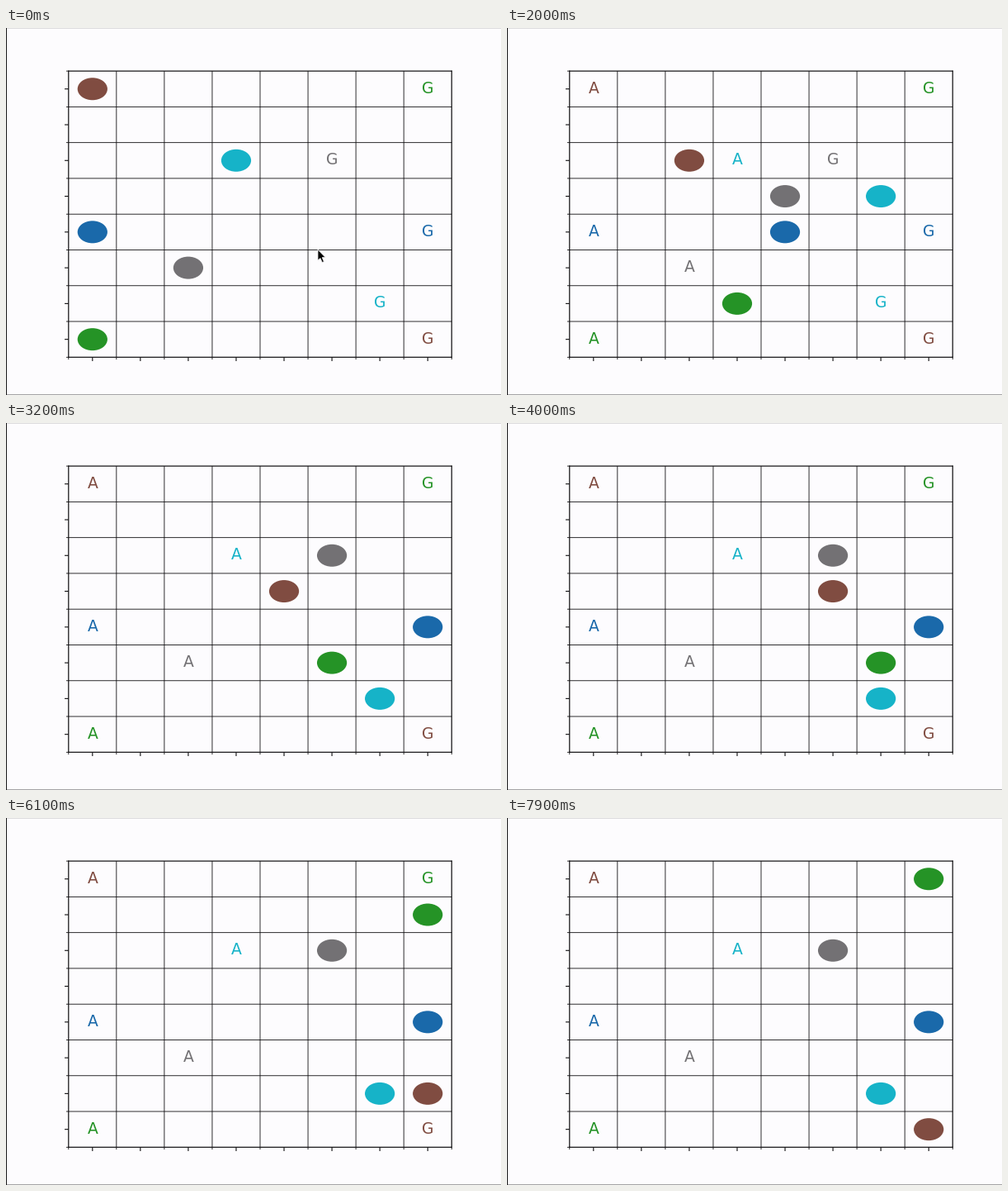
A matplotlib script that plays this animation: 600x444 px, repeating every 8000 ms.

```python
import matplotlib.pyplot as plt
from matplotlib.animation import FuncAnimation
from matplotlib.patches import Ellipse, Polygon

W, H, DPI = 600, 444, 100
FRAMES, INTERVAL = 80, 100
HOLD = 5                      # frames per grid move
N = 8
LEFT, RIGHT, TOP, BOTTOM = 75.8, 540.2, 52.1, 398.3
CW, CH = (RIGHT - LEFT) / N, (BOTTOM - TOP) / N
INK = "#0c0b0d"
STEP = {"U": (0, -1), "D": (0, 1), "L": (-1, 0), "R": (1, 0)}

# colour, start cell (column, row), moves
AGENTS = [
    ("#804c41", (0, 0), "DRDRRRDRDRDRDD"),
    ("#16b3c8", (3, 2), "DRRRDDD"),
    ("#1a69aa", (0, 4), "RRRRRRR"),
    ("#737174", (2, 5), "RRUURU"),
    ("#259326", (0, 7), "URRRRRURUURUUU"),
]


def px(width):
    return width * 72 / DPI


def center(cell):
    return LEFT + (cell[0] + 0.5) * CW, TOP + (cell[1] + 0.5) * CH


def route(start, moves):
    cells = [start]
    for m in moves:
        dx, dy = STEP[m]
        x, y = cells[-1]
        cells.append((x + dx, y + dy))
    return cells


fig = plt.figure(figsize=(W / DPI, H / DPI), dpi=DPI, facecolor="#fdfcfe")
ax = fig.add_axes([0, 0, 1, 1])
ax.set_xlim(0, W)
ax.set_ylim(H, 0)
ax.axis("off")


def line(x0, y0, x1, y1, width=0.85, color=INK):
    # snapping would shift the lines by up to a pixel
    ax.plot([x0, x1], [y0, y1], color=color, lw=px(width), snap=False,
            solid_capstyle="butt", zorder=1)


# window edges
line(0, 0.5, W, 0.5, 1, "#dddcde")
line(0, H - 0.5, W, H - 0.5, 1, "#a5a4a6")
line(0.5, 0, 0.5, H, 1, "#1a191b")

# grid, frame and ticks
for i in range(N + 1):
    x, y = LEFT + i * CW, TOP + i * CH
    if 0 < i < N:
        line(x, TOP, x, BOTTOM)
        line(LEFT, y, RIGHT, y)
    line(x, BOTTOM, x, BOTTOM + 2.8)
    line(LEFT - 2.8, y, LEFT, y)
    if i < N:
        cx, cy = center((i, i))
        line(cx, BOTTOM, cx, BOTTOM + 4.7, 1.1)
        line(LEFT - 4.7, cy, LEFT, cy, 1.1)
for x in (LEFT, RIGHT):
    line(x, TOP - 0.5, x, BOTTOM + 0.5, 1.2)
for y in (TOP, BOTTOM):
    line(LEFT - 0.5, y, RIGHT + 0.5, y, 1.2)

routes, discs = [], []
for color, start, moves in AGENTS:
    cells = route(start, moves)
    for letter, cell in (("A", cells[0]), ("G", cells[-1])):
        x, y = center(cell)
        ax.text(x, y - 0.5, letter, color=color, fontsize=px(18.8),
                family="DejaVu Sans", ha="center", va="center", zorder=2)
    disc = Ellipse(center(start), 36.2, 27, fc=color, ec="none", zorder=3)
    ax.add_patch(disc)
    routes.append(cells)
    discs.append(disc)

pointer = Polygon(
    [(378, 268), (378, 281.2), (381, 278.6), (383.3, 283.6), (385.4, 282.6),
     (383.2, 277.7), (387, 277.4)],
    fc="black", ec="#e9e8ea", lw=px(0.8), zorder=4)
ax.add_patch(pointer)


def draw(frame):
    step = (frame + HOLD - 1) // HOLD
    for disc, cells in zip(discs, routes):
        disc.set_center(center(cells[min(step, len(cells) - 1)]))
    pointer.set_visible(frame == 0)
    return discs + [pointer]


anim = FuncAnimation(fig, draw, frames=FRAMES, interval=INTERVAL,
                     repeat=True, repeat_delay=0, blit=False)
plt.show()
```
